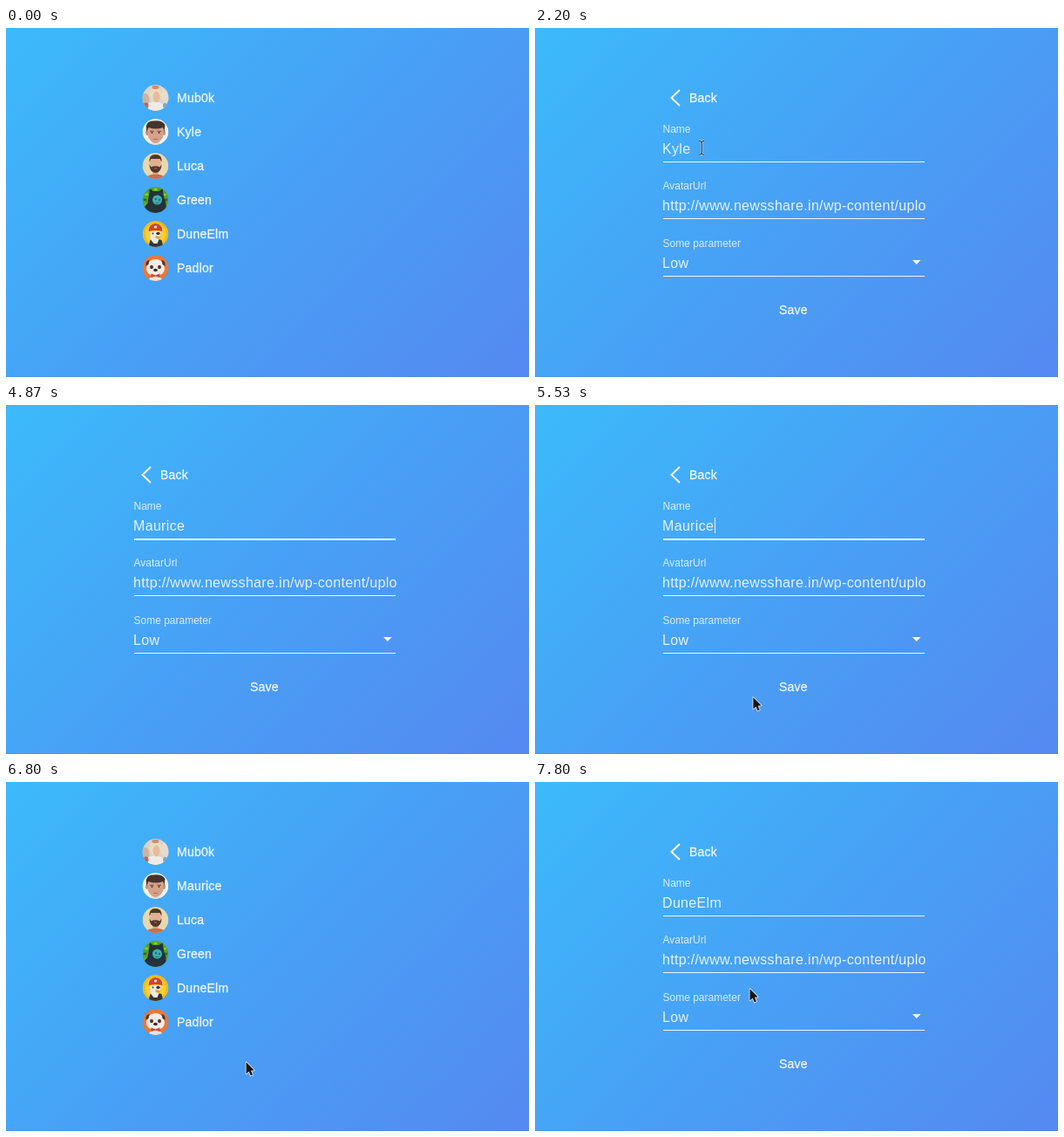
An HTML page with a canvas for the animation above (8000 ms loop, 600x400 px).

```html
<!DOCTYPE html>
<html lang="en">
<head>
<meta charset="utf-8">
<title>Editable user list</title>
<style>
  html, body { margin: 0; width: 100%; height: 100%; overflow: hidden; background: #48a0f5; }
  canvas { display: block; width: 600px; height: 400px; }
</style>
</head>
<body>
<canvas id="stage" width="600" height="400"></canvas>
<script>
const ctx = document.getElementById('stage').getContext('2d');
const LOOP = 8000, FPS = 15;
const LEFT = 147, WIDTH = 300, ROW = 39;
const USERS = ['Mub0k', 'Kyle', 'Luca', 'Green', 'DuneElm', 'Padlor'];
const NEW_NAME = 'Maurice';
const URL_TEXT = 'http://www.newsshare.in/wp-content/uplo';
const SPACING = 0.33;

// Moments, counted in ticks of 1/15 s
const T = {
  enter: 8, rest: 16, open: 26, focus: 36, drag: 37, dragEnd: 43,
  typing: 51, blinkOff: 73, moveOn: 75, onSave: 84, press: 88, saved: 93,
  leave: 102, rest2: 110, open2: 117
};
// Tick at which so many letters have been typed
const KEYS = [[51, 1], [55, 2], [58, 4], [60, 5], [64, 6], [65, 7]];

const clamp = v => Math.max(0, Math.min(1, v));
const part = (t, a, b) => clamp((t - a) / (b - a));
const smooth = u => u * u * (3 - 2 * u);
const lerp = (a, b, u) => a + (b - a) * u;
const white = a => `rgba(255,255,255,${a})`;

function curve(a, c, b, u) {
  const v = 1 - u;
  return [0, 1].map(i => a[i] * v * v + 2 * c[i] * u * v + b[i] * u * u);
}

const sky = ctx.createLinearGradient(50, -50, 550, 450);
sky.addColorStop(0, '#3cbafb');
sky.addColorStop(0.5, '#48a0f5');
sky.addColorStop(1, '#5589f1');

function setFont(size, spacing) {
  ctx.font = `${size}px "Liberation Sans", Arial, sans-serif`;
  ctx.letterSpacing = spacing + 'px';
}

function text(str, x, y, size, alpha = 0.9, spacing = 0) {
  setFont(size, spacing);
  ctx.fillStyle = white(alpha);
  ctx.fillText(str, x, y);
}

// Medium weight: a regular face with a hairline outline
function mediumText(str, x, y, alpha = 0.88) {
  text(str, x, y, 14, alpha, 0.25);
  ctx.strokeStyle = white(alpha);
  ctx.lineWidth = 0.3;
  ctx.strokeText(str, x, y);
}

function rect(x, y, w, h, color) {
  ctx.fillStyle = color;
  ctx.fillRect(x, y, w, h);
}

function oval(x, y, rx, ry, color) {
  ctx.fillStyle = color;
  ctx.beginPath();
  ctx.ellipse(x, y, rx, ry, 0, 0, 7);
  ctx.fill();
}

function shape(d, color) {
  ctx.fillStyle = color;
  ctx.fill(new Path2D(d));
}

// Each avatar is drawn around its own centre, clipped to a circle
const AVATARS = [
  () => {
    oval(0, 0, 15, 15, '#ddd3ca');
    oval(-12, 3, 5, 8, '#cdb3a3');
    oval(12, -3, 6, 8, '#e6dccd');
    shape('M-11 15L-8 6L0 4L9 7L12 15Z', '#f1ebe6');
    oval(0, -4, 6.5, 9, '#eddcb9');
    oval(1, -1, 4, 6.5, '#e2bda0');
    oval(0, -12, 4, 2.2, '#d08c78');
    oval(-11, 9, 3, 3.5, '#b9655f');
    oval(11, 9, 2.5, 3, '#8ba6b4');
  },
  () => {
    oval(0, 0, 15, 15, '#f5f3f1');
    oval(0, 16, 11, 4, '#e2dedb');
    oval(-9.5, 1, 2, 3, '#c68f77');
    oval(9.5, 1, 2, 3, '#c68f77');
    shape('M-9-6Q0-10 9-6L8.5 6Q5 13 0 13Q-5 13-8.5 6Z', '#d6a189');
    shape('M-10 0Q-13-12-3-12.5Q8-14 11-8L10 0L8.5-5Q0-2-8-5Z', '#44332f');
    rect(-6.5, -1.2, 4.5, 1, '#6b4a3e');
    rect(2, -1.2, 4.5, 1, '#6b4a3e');
    oval(-4, 1, 1, 0.9, '#4a352d');
    oval(4, 1, 1, 0.9, '#4a352d');
    rect(-2.5, 8, 5, 1, '#ad6c5c');
  },
  () => {
    oval(0, 0, 15, 15, '#e9d7ae');
    oval(0, 15, 11, 5.5, '#d8693f');
    rect(-3, 5, 6, 5, '#d3a184');
    oval(0, -2, 6.3, 8.5, '#e0b091');
    shape('M-7-4Q-8-13 0-13Q8-13 7-4L5-8L-5-8Z', '#50372d');
    shape('M-7-2L-5 1.5Q0-1 5 1.5L7-2Q7 7.5 0 8Q-7 7.5-7-2Z', '#50372d');
    rect(-1.7, 2.6, 3.4, 0.9, '#a87462');
  },
  () => {
    oval(0, 0, 15, 15, '#56a32b');
    for (let i = 0; i < 12; i++) {
      const a = i * 0.524;
      oval(12 * Math.cos(a), 12 * Math.sin(a), 2, 1.4, i % 2 ? '#86d035' : '#2e6630');
    }
    shape('M-6-13L-3-10L5-10L8-13L10-2Q14 6 11 15L-13 15Q-14 7-9 4Q-8-4-6-13Z', '#25323a');
    oval(2, 0, 5.5, 5.5, '#3fb0ae');
    oval(0.5, -1, 1.2, 1.2, '#236f77');
    oval(4.5, 0, 1.2, 1.2, '#236f77');
    rect(0, 2.8, 4, 0.9, '#236f77');
  },
  () => {
    oval(0, 0, 15, 15, '#efbb1c');
    oval(0, 0, 12, 12, '#f9cf33');
    shape('M-8 15L-6 7L0 5L7 7L9 15Z', '#34353a');
    shape('M-6-3L6-3L5 4L2 11L-2 11L-6 6Z', '#eeeae2');
    shape('M-8-3Q-8-11 0-12Q8-11 8-3Q0-5-8-3Z', '#cf4138');
    oval(0, -8, 1.8, 1.5, '#efd9cf');
    oval(3, -0.5, 2.2, 1.8, '#35363a');
    oval(-3, -0.5, 1, 0.9, '#35363a');
    shape('M0 2L6 3L4 6L0 5Z', '#dba73e');
  },
  () => {
    oval(0, 0, 15, 15, '#ec7738');
    oval(0, 15, 8, 5.5, '#efe3d8');
    shape('M-10-3Q-7-10 0-10Q7-10 10-3Q12 6 5 8Q0 10-5 8Q-12 6-10-3Z', '#f4ece4');
    shape('M-7-9Q-12-8-11-2L-8-4Z', '#4a3430');
    shape('M7-9Q12-8 11-2L8-4Z', '#4a3430');
    oval(-4.5, -1, 2, 2.3, '#4e3a35');
    oval(4.5, -1, 2, 2.3, '#4e3a35');
    oval(0, 2.5, 2.4, 1.7, '#3b2c2a');
    shape('M-5 6.5L0 8.5L5 6.5L5 11L0 9.5L-5 11Z', '#c9463c');
  }
];

function avatar(i) {
  ctx.save();
  ctx.translate(171.5, 80 + ROW * i);
  ctx.beginPath();
  ctx.arc(0, 0, 15, 0, 7);
  ctx.clip();
  AVATARS[i]();
  ctx.restore();
}

function list(hover, renamed) {
  USERS.forEach((name, i) => {
    if (i === hover) rect(LEFT, 62 + ROW * i, WIDTH, 36, white(0.2));
    avatar(i);
    mediumText(renamed && i === 1 ? NEW_NAME : name, 196, 85 + ROW * i);
  });
}

function rowAt([x, y]) {
  const inside = x >= LEFT && x < LEFT + WIDTH && y >= 62 && (y - 62) % ROW < 36;
  const row = Math.floor((y - 62) / ROW);
  return inside && row < USERS.length ? row : -1;
}

function field(label, value, y, thick) {
  text(label, 146.5, y, 12, 0.8);
  text(value, 146, y + 24, 16, 0.86, SPACING);
  rect(LEFT, y + 33, WIDTH, thick ? 2 : 1, white(0.9));
}

function nameWidth(str) {
  setFont(16, SPACING);
  return ctx.measureText(str).width;
}

function form(name, { focused, caret, selectFrom, hover = 0, ripple = 0 }) {
  ctx.strokeStyle = white(0.95);
  ctx.lineWidth = 2;
  ctx.stroke(new Path2D('M166 71L156.5 80L166 89'));
  mediumText('Back', 177, 85);

  const end = 146 + nameWidth(name);
  if (selectFrom < end) {
    const from = Math.max(146, selectFrom);
    rect(from, 129, end - from, 18, 'rgba(180,213,254,0.5)');
  }
  field('Name', name, 120, focused);
  if (caret) rect(Math.round(end + 0.6), 129, 1, 18, white(0.85));
  field('AvatarUrl', URL_TEXT, 185);
  field('Some parameter', 'Low', 251);
  shape('M433 266L442.5 266L437.75 271Z', white(0.95));

  ctx.save();
  ctx.beginPath();
  ctx.roundRect(LEFT, 305, WIDTH, 36, 2);
  ctx.clip();
  rect(LEFT, 305, WIDTH, 36, white(0.3 * hover));
  if (ripple) oval(273, 324, ripple, ripple, white(0.45));
  ctx.restore();
  mediumText('Save', 280, 328);
}

const ARROW = new Path2D('M.5 1L.5 14.5L3.6 11.7L5.8 16.6L8 15.6L5.9 10.8L9.8 10.5Z');
const HAND = new Path2D('M-1 .5Q1-.5 2 2L3.5 6Q5 5 6 6.5Q7.5 5.8 8.5 7Q10.5 6.5 11 9' +
  'Q11.5 12 10 16L3 16L1 13.5L-3.6 9.8Q-4.5 7.8-1.5 8.2L.5 9.5L-2 2.5Q-2.3 1-1 .5Z');
const FINGERS = new Path2D('M4 10L5 13.5M6.3 10L7 13.5M8.5 10L8.7 13.5');
const BEAM = new Path2D('M-3-8Q0-8 0-6Q0-8 3-8M0-6L0 6M-3 8Q0 8 0 6Q0 8 3 8');

function outline(path, color, width) {
  ctx.strokeStyle = color;
  ctx.lineWidth = width;
  ctx.stroke(path);
}

const POINTERS = {
  arrow() {
    outline(ARROW, white(0.9), 1.5);
    ctx.fillStyle = '#151515';
    ctx.fill(ARROW);
  },
  hand() {
    ctx.fillStyle = '#fff';
    ctx.fill(HAND);
    outline(HAND, '#111', 1.3);
    outline(FINGERS, '#111', 0.8);
  },
  beam() {
    outline(BEAM, white(0.7), 2.4);
    outline(BEAM, '#111', 1);
  }
};

function pointer(kind, [x, y]) {
  ctx.save();
  ctx.translate(x, y);
  ctx.lineJoin = 'round';
  POINTERS[kind]();
  ctx.restore();
}

function browse(t) {
  if (t < T.enter) return list(-1);
  const pos = curve([527, 67], [460, 140], [255, 126], smooth(part(t, T.enter, T.rest)));
  const row = rowAt(pos);
  list(row);
  pointer(row < 0 ? 'arrow' : 'hand', pos);
}

function selectName(t) {
  const u = smooth(part(t, T.open, T.focus - 1));
  let pos = [lerp(255, 182, u), lerp(126, 139, u)];
  const dragging = t >= T.drag;
  if (dragging) {
    const d = smooth(part(t, T.drag, T.dragEnd));
    pos = [lerp(182, 13, d), lerp(139, 149, d)];
  }
  form(USERS[1], {
    focused: t >= T.focus,
    caret: t >= T.focus && !dragging,
    selectFrom: dragging ? pos[0] : Infinity
  });
  pointer(pos[1] < 128 ? 'arrow' : 'beam', pos);
}

function typeAndSave(t) {
  const count = KEYS.filter(k => t >= k[0]).pop()[1];
  const pressed = t >= T.press;
  form(NEW_NAME.slice(0, count), {
    focused: !pressed,
    caret: !pressed && (t < T.blinkOff || t >= T.blinkOff + 8),
    hover: part(t, T.onSave - 1, T.onSave + 2),
    ripple: pressed ? 10 + 23.5 * (t - T.press) : 0
  });
  if (t < T.moveOn) return;
  const u = smooth(part(t, T.moveOn - 1, T.onSave + 1));
  const pos = curve([9, 148], [140, 390], [273, 325], u);
  pointer(t >= T.onSave ? 'hand' : 'arrow', pos);
}

function browseAgain(t) {
  if (t < T.leave) {
    list(-1, true);
    return pointer('hand', [273, 325]);
  }
  const u = smooth(part(t, T.leave, T.rest2));
  const pos = [lerp(275, 246, u), lerp(320, 236, u)];
  const row = rowAt(pos);
  list(row, true);
  pointer(row < 0 ? 'arrow' : 'hand', pos);
}

function draw(ms) {
  const t = Math.floor((ms % LOOP + 4) * FPS / 1000) % (LOOP * FPS / 1000);
  rect(0, 0, 600, 400, sky);
  rect(0, 399, 600, 1, 'rgba(90,110,150,0.25)');
  if (t < T.open) browse(t);
  else if (t < T.typing) selectName(t);
  else if (t < T.saved) typeAndSave(t);
  else if (t < T.open2) browseAgain(t);
  else {
    form(USERS[4], {});
    pointer('arrow', [246, 236]);
  }
}

const start = performance.now();
function loop() {
  draw(performance.now() - start);
  requestAnimationFrame(loop);
}
loop();
</script>
</body>
</html>
```
